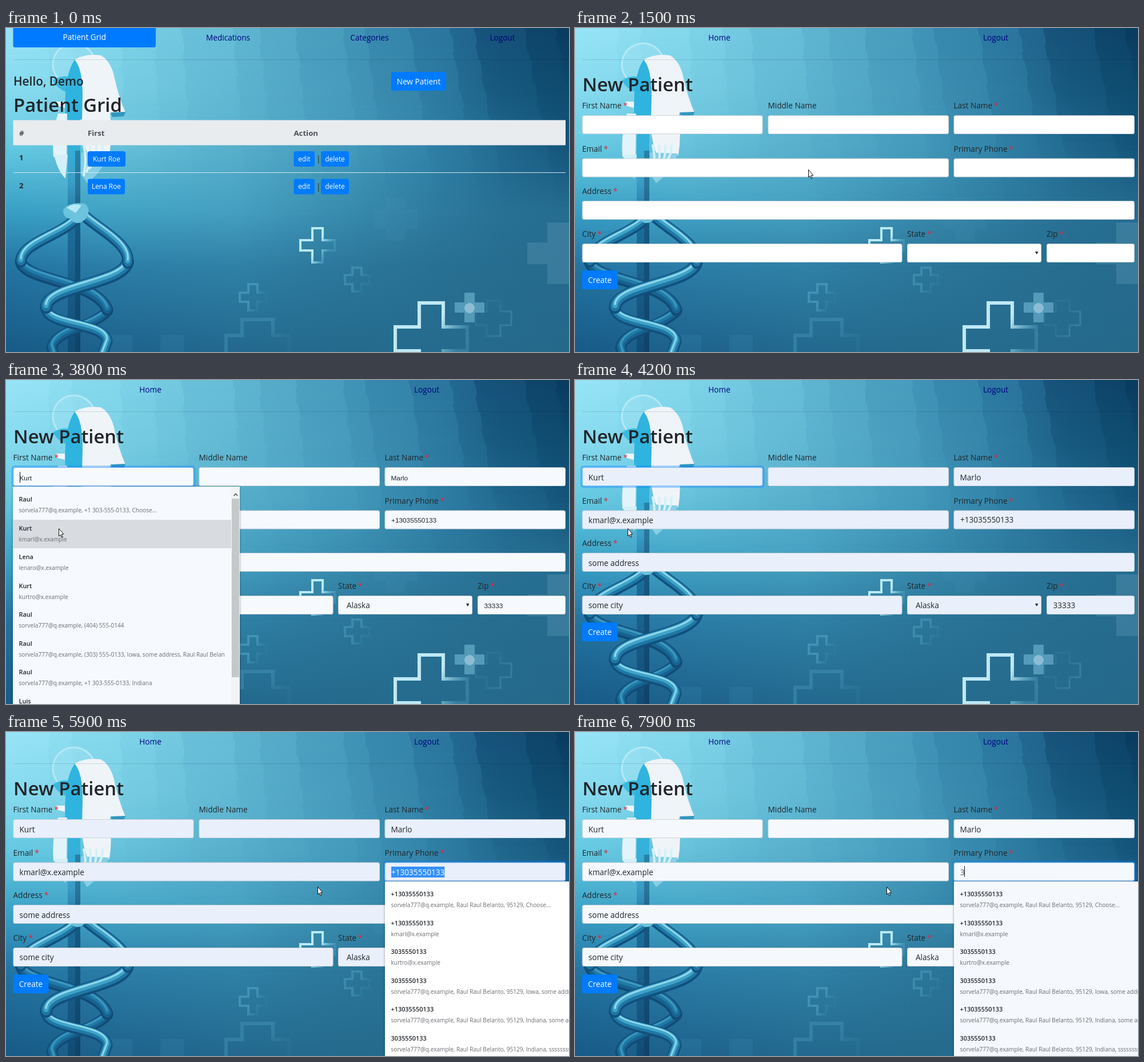
Write an HTML page with a canvas that moves like this. It is 985 by 568 pixels and loops after 8 s.

```html
<!DOCTYPE html>
<html lang="en">
<head>
<meta charset="utf-8">
<title>Patient form</title>
<style>
html, body { margin: 0; width: 100%; height: 100%; overflow: hidden; background: #2a7599; }
canvas { display: block; }
</style>
</head>
<body>
<canvas id="stage" width="985" height="568"></canvas>
<script>
const W = 985, H = 568, LOOP = 8000;
const SANS = '"Open Sans", sans-serif', ARIAL = '"Liberation Sans", sans-serif';
const BLUE = '#007bff', INK = '#212529';
const ctx = document.getElementById('stage').getContext('2d');

// ---------- background ----------
const skyX = [0, 200, 400, 600, 750, 870, 985];
const skyY = [0, 110, 210, 320, 420, 568];
const sky = [
  '9be6f9 80d6ea 61b8d4 4196b8 2a769f 154f78 0a3b5f',
  '88dcf1 78cfe4 5eb6d2 4598ba 2f7da3 175a80 0d4a6d',
  '62c8e1 66c0d9 57aecb 439abb 3080a6 22698f 14547a',
  '389fc5 42a3c4 459fc0 388bad 2e7b9f 287094 256c90',
  '2273a2 2b7da7 2f80a5 2b769a 287093 266d90 256b8e',
  '175a87 1d628c 23688e 246a8d 256b8e 256a8d 246889'
].map(row => row.split(' ').map(h => [0, 2, 4].map(i => parseInt(h.substr(i, 2), 16))));

const mix = (a, b, k) => a + (b - a) * k;
const mixColor = (a, b, k) => a.map((v, i) => mix(v, b[i], k));
const rgb = c => `rgb(${c.map(Math.round)})`;

function span(list, v) {
  let i = 0;
  while (i < list.length - 2 && v > list[i + 1]) i++;
  return [i, Math.min(1, Math.max(0, (v - list[i]) / (list[i + 1] - list[i])))];
}

function skyAt(x, y) {
  const [i, u] = span(skyX, x), [j, v] = span(skyY, y);
  return mixColor(mixColor(sky[j][i], sky[j][i + 1], u), mixColor(sky[j + 1][i], sky[j + 1][i + 1], u), v);
}

function path(g, points, close) {
  g.beginPath();
  points.forEach(([x, y], i) => i ? g.lineTo(x, y) : g.moveTo(x, y));
  if (close) g.closePath();
}

function cross(g, cx, cy, r, arm) {
  const quarter = [[-arm, -arm], [-arm, -r], [arm, -r]];
  const pts = [];
  for (let q = 0; q < 4; q++)
    for (const [x, y] of quarter) {
      const [a, b] = [[x, y], [-y, x], [-x, -y], [y, -x]][q];
      pts.push([cx + a, cy + b]);
    }
  path(g, pts, true);
}

function outlineCross(g, cx, cy, r, arm, width, from, to) {
  const fade = g.createLinearGradient(cx - r, cy - r / 2, cx + r, cy + r / 2);
  fade.addColorStop(0, from);
  fade.addColorStop(0.5, from);
  fade.addColorStop(0.85, to);
  cross(g, cx, cy, r, arm);
  g.lineWidth = width;
  g.strokeStyle = fade;
  g.stroke();
}

const FRONT = ['#12507d', '#1f77a4', '#3fa3c8', '#8cd6e9'];
const BACK = ['#114b76', '#18628f', '#2079a6', '#3c98bf'];

function tube(g, d, width, tones) {
  const p = new Path2D(d);
  [[1, 0], [0.75, -1.5], [0.42, -3.5], [0.16, -6]].forEach(([scale, dy], i) => {
    g.save();
    g.translate(0, dy);
    g.lineWidth = width * scale;
    g.strokeStyle = tones[i];
    g.stroke(p);
    g.restore();
  });
}

function fillPath(g, d, color) {
  g.fillStyle = color;
  g.fill(new Path2D(d));
}

function paintStaff(g) {
  g.lineCap = 'round';
  g.lineJoin = 'round';
  const rod = g.createLinearGradient(0, 60, 0, H);
  [[0, '#2bb3df'], [0.28, '#35b2da'], [0.42, '#3a9cc4'], [0.55, '#1d6f9b'], [1, '#124b74']]
    .forEach(s => rod.addColorStop(...s));
  g.fillStyle = rod;
  g.fillRect(108, 150, 22, H - 150);
  g.fillStyle = 'rgba(10,50,85,.35)';
  g.fillRect(121, 215, 9, H - 215);

  // globe and wings
  g.fillStyle = 'rgba(190,238,249,.22)';
  g.strokeStyle = '#b3e9f6';
  g.lineWidth = 3;
  g.beginPath();
  g.arc(119, 64, 37, 0, 7);
  g.fill();
  g.stroke();
  fillPath(g, 'M82 92Q98 82 110 86L104 112Q90 106 82 92Z', '#3cb9de');
  fillPath(g, 'M121 55Q140 44 166 48Q184 58 190 88Q198 124 209 148L182 150Q186 190 181 222Q168 232 150 238Q132 205 131 150Q130 90 121 55Z', '#eff4f9');
  fillPath(g, 'M120 56Q134 70 134 120L133 160L104 160Q100 84 120 56Z', '#2fb4df');
  fillPath(g, 'M183 148L209 147L206 155L186 156Z', '#3197bf');
  fillPath(g, 'M88 129L103 129L103 140L88 136Z', '#e9f7fc');
  fillPath(g, 'M91 150Q80 185 83 226L106 229L107 150Z', '#e3f3fa');
  fillPath(g, 'M84 222Q90 250 104 264L108 222Z', '#d4eff8');
  fillPath(g, 'M131 218L180 220Q170 250 142 272L131 255Z', '#86cfe5');
  g.strokeStyle = '#d4f1f9';
  g.lineWidth = 4;
  for (let i = 0; i < 4; i++) {
    g.beginPath();
    g.moveTo(136 + i * 11, 206);
    g.quadraticCurveTo(142 + i * 9, 230, 136 + i * 5, 258 - i * 6);
    g.stroke();
  }

  // helix
  tube(g, 'M178 496C150 526 86 530 80 560L84 574', 19, BACK);
  tube(g, 'M26 410C34 444 160 444 177 494', 21, BACK);
  tube(g, 'M70 492C74 524 174 516 177 550L168 574', 19, FRONT);
  tube(g, 'M213 410C204 450 72 452 70 490', 22, FRONT);
  tube(g, 'M136 328C160 352 218 378 213 412', 20, FRONT);
  tube(g, 'M126 328C108 362 26 374 26 410', 20, FRONT);
  fillPath(g, 'M100 318Q112 304 138 308Q150 318 140 334Q124 350 112 334Q100 334 100 318Z', '#6cc3de');
  fillPath(g, 'M106 315Q118 306 132 311L122 324Z', '#b4eaf5');
}

function paintBackground() {
  const layer = document.createElement('canvas');
  layer.width = W;
  layer.height = H;
  const g = layer.getContext('2d');
  for (let y = 0; y < H; y += 2) {
    const grad = g.createLinearGradient(0, 0, W, 0);
    skyX.forEach(x => grad.addColorStop(x / W, rgb(skyAt(x, y))));
    g.fillStyle = grad;
    g.fillRect(0, y, W, 2);
    // stepped rays, strongest near the top
    g.globalAlpha = Math.max(0, 0.8 - y / 450);
    for (let i = 0; i < 16; i++) {
      const edge = k => k * 64 + 14 * Math.sin(k * 2.3) + Math.min(y, 300) * 0.22 * k / 16
        + 2 * Math.sin(Math.floor(y / 14) * 1.7 + k);
      const a = i ? Math.round(edge(i)) : 0, b = Math.round(edge(i + 1));
      g.fillStyle = rgb(skyAt((a + b) / 2, y));
      g.fillRect(a, y, b - a, 2);
    }
    g.globalAlpha = 1;
  }

  g.fillStyle = 'rgba(110,165,190,.28)';
  cross(g, 966, 395, 54, 19);
  g.fill();
  g.fillStyle = 'rgba(90,160,190,.1)';
  cross(g, 682, 335, 38, 17);
  g.fill();
  g.fillStyle = 'rgba(70,150,185,.16)';
  g.fillRect(181, 538, 40, 30);
  g.fillRect(270, 538, 41, 30);

  outlineCross(g, 432, 472, 23, 8, 4, 'rgba(76,160,192,.65)', 'rgba(60,140,175,.15)');
  outlineCross(g, 440, 566, 55, 27, 6, 'rgba(66,146,180,.5)', 'rgba(50,125,160,.2)');
  outlineCross(g, 614, 441, 21, 8, 4, 'rgba(76,160,192,.5)', 'rgba(60,140,175,.2)');
  outlineCross(g, 853, 509, 31, 12, 3, 'rgba(80,155,185,.15)', 'rgba(80,155,185,.4)');
  outlineCross(g, 545, 381, 30, 9, 4, '#b9eaf6', 'rgba(90,175,205,.3)');
  outlineCross(g, 744, 545, 63, 21, 6, '#bfe9f5', 'rgba(90,170,200,.3)');
  g.fillStyle = 'rgba(95,165,195,.8)';
  cross(g, 811, 490, 26, 9);
  g.fill();
  g.fillStyle = '#8dbdd4';
  g.beginPath();
  g.arc(811, 491, 9, 0, 7);
  g.fill();

  paintStaff(g);
  return layer;
}
const background = paintBackground();

// ---------- widgets ----------
function text(s, x, y, size = 13.6, { color = INK, weight = 400, align = 'left', family = SANS } = {}) {
  ctx.font = `${weight} ${size}px ${family}`;
  ctx.fillStyle = color;
  ctx.textAlign = align;
  ctx.fillText(s, x, y);
  return ctx.measureText(s).width;
}

function box(x, y, w, h, fill, radius = 3.6) {
  ctx.beginPath();
  ctx.roundRect(x, y, w, h, radius);
  ctx.fillStyle = fill;
  ctx.fill();
}

function button(label, x, y, w, h, size = 13.6, fill = BLUE) {
  box(x, y, w, h, fill);
  text(label, x + w / 2, y + h / 2 + size * 0.37, size, { color: '#fff', align: 'center' });
}

function nav(items) {
  for (const [label, x] of items) text(label, x, 22, 13.6, { color: '#00007f', align: 'center' });
  ctx.fillStyle = 'rgba(0,0,0,.12)';
  ctx.fillRect(13, 55, 966, 1);
}

function caret(x, y) {
  ctx.fillStyle = '#111';
  ctx.fillRect(Math.round(x), y, 1, 19);
}

function field(x, y, w, fill, focus) {
  if (focus) box(x - 3, y - 3, w + 6, 39, 'rgba(0,123,255,.33)', 6);
  box(x, y, w, 33, focus ? '#80bdff' : '#ced4da');
  box(x + 1, y + 1, w - 2, 31, fill, 3);
}

function label(s, x, y, required = true) {
  const w = text(s, x, y);
  if (required) text('*', x + w + 3, y, 13.6, { color: '#f02030' });
}

function pointer(x, y) {
  path(ctx, [[0, 0], [0, 13.5], [3.1, 10.7], [5.2, 15.5], [7.3, 14.6], [5.2, 10], [9.2, 9.7]]
    .map(([a, b]) => [x + 0.5 + a * 0.9, y + 0.5 + b]), true);
  ctx.fillStyle = '#fff';
  ctx.fill();
  ctx.lineWidth = 1;
  ctx.strokeStyle = '#111';
  ctx.stroke();
}

function suggestions(x, y, w, items, fill, active = -1) {
  ctx.save();
  ctx.shadowColor = 'rgba(0,0,0,.35)';
  ctx.shadowBlur = 4;
  ctx.fillStyle = fill;
  ctx.fillRect(x, y, w, H);
  ctx.restore();
  items.forEach(([title, detail], i) => {
    const top = y + 7 + i * 50.5;
    if (i === active) {
      ctx.fillStyle = '#d8dbdf';
      ctx.fillRect(x, Math.round(top), w - 15, 50);
    }
    text(title, x + 10.5, top + 19, 10.9, { weight: 600 });
    text(detail, x + 10.5, top + 38, 10.1, { color: '#6a6d72' });
  });
}

// ---------- content ----------
const MAIL = 'sorvela777@q.example', FULL = 'Raul Raul Belanto', PHONE = '+13035550133';
const people = [
  ['Raul', `${MAIL}, +1 303-555-0133, Choose...`],
  ['Kurt', 'kmarl@x.example'],
  ['Lena', 'lenaro@x.example'],
  ['Kurt', 'kurtro@x.example'],
  ['Raul', `${MAIL}, (404) 555-0144`],
  ['Raul', `${MAIL}, (303) 555-0133, Iowa, some address, Raul Raul Belan`],
  ['Raul', `${MAIL}, +1 303-555-0133, Indiana`],
  ['Luis', '']
];
const phones = [
  [PHONE, `${MAIL}, ${FULL}, 95129, Choose...`],
  [PHONE, 'kmarl@x.example'],
  ['3035550133', 'kurtro@x.example'],
  ['3035550133', `${MAIL}, ${FULL}, 95129, Iowa, some address`],
  [PHONE, `${MAIL}, ${FULL}, 95129, Indiana, some address`],
  ['3035550133', `${MAIL}, ${FULL}, 95129, Indiana, ssssssssssss`]
];
const raul = { first: 'Raul', last: 'Belanto', phone: PHONE, state: 'Choose...', zip: '95129' };
const kurt = {
  first: 'Kurt', last: 'Marlo', phone: PHONE, state: 'Alaska', zip: '33333',
  email: 'kmarl@x.example', address: 'some address', city: 'some city'
};

function gridPage(t) {
  nav([['Medications', 388.5], ['Categories', 636], ['Logout', 868.5]]);
  button('Patient Grid', 12.5, -3, 249.5, 37);
  text('Hello, Demo', 13, 101, 20.8, { weight: 600 });
  text('Patient Grid', 13, 147, 32.8, { weight: 600 });
  button('New Patient', 674, 77, 96, 33, 13.6, t >= 1000 ? '#0069d9' : BLUE);
  ctx.fillStyle = '#e9ecef';
  ctx.fillRect(12.5, 161.5, 966.5, 44);
  for (const [s, x] of [['#', 23], ['First', 143], ['Action', 503.5]])
    text(s, x, 188.5, 13.2, { color: '#495057', weight: 700 });
  ['Kurt Roe', 'Lena Roe'].forEach((name, i) => {
    const y = 216 + i * 48.5;
    text(i + 1, 23, y + 16, 13.2, { weight: 700 });
    button(name, 143, y, i ? 65 : 66, 27, 11.9);
    button('edit', 503.5, y, 36.5, 27, 11.9);
    text('|', 543, y + 18);
    button('delete', 551, y, 49, 27, 11.9);
  });
  ctx.fillStyle = '#cfe6ee';
  ctx.fillRect(13, 253, 966, 1);
}

function formPage(t) {
  const preview = t >= 2600 && t < 4200;
  const data = t < 2600 ? {} : t < 3400 ? raul : kurt;
  const fill = t < 2600 ? '#fff' : preview ? '#f6fafe' : t < 7900 ? '#e9f0fc' : '#f5f9fe';
  const firstFocus = t >= 2400 && t < 5400, phoneFocus = t >= 5400;
  const value = (s, x, y) => s && text(s, x, y, preview ? 11.8 : 13.6, { family: preview ? ARIAL : SANS });

  nav([['Home', 252.5], ['Logout', 736]]);
  text('New Patient', 13, 111, 32.8, { weight: 600 });
  label('First Name', 12.5, 141);
  label('Middle Name', 337.5, 141, false);
  label('Last Name', 662.5, 141);
  label('Email', 12.5, 217);
  label('Primary Phone', 662.5, 217);
  label('Address', 12.5, 291);
  label('City', 12.5, 366);
  label('State', 581, 366);
  label('Zip', 825, 366);

  field(12.5, 153, 316, fill, firstFocus);
  field(337.5, 153, 316.5, fill);
  field(662.5, 153, 316.5, fill);
  field(12.5, 228.5, 641.5, fill);
  field(662.5, 228.5, 316.5, fill, phoneFocus);
  field(12.5, 303, 966.5, fill);
  field(12.5, 378, 560, fill);
  field(581, 378, 235, fill);
  field(825, 378, 154, fill);
  path(ctx, [[805, 392], [810.5, 392], [807.8, 397]], true);
  ctx.fillStyle = '#222';
  ctx.fill();

  value(data.first, 23.5, 176);
  value(data.last, 673.5, 176);
  value(data.email, 23.5, 251);
  value(data.address, 23.5, 326);
  value(data.city, 23.5, 400);
  value(data.zip, 836.5, 400);
  if (data.state) text(data.state, 596, 400);

  if (t < 5600) value(data.phone, 674, 250);
  else if (t < 6900) {
    ctx.font = `13.6px ${SANS}`;
    ctx.fillStyle = '#3390ff';
    ctx.fillRect(674, 236, ctx.measureText(PHONE).width, 19);
    text(PHONE, 674, 251, 13.6, { color: '#fff' });
  } else if (t >= 7900) text('3', 674, 251, 13.6, { color: '#555' });

  button('Create', 12.5, 425, 62, 33);

  const listOpen = t >= 2400 && t < 4200;
  if (listOpen) {
    suggestions(12, 187, 397, people, t < 2600 ? '#fff' : '#f6fafe', t < 2600 ? -1 : t < 3400 ? 0 : 1);
    ctx.fillStyle = '#f1f3f5';
    ctx.fillRect(394, 188, 15, H);
    ctx.fillStyle = '#c5c8cb';
    ctx.fillRect(395, 208, 13, 313);
    path(ctx, [[398.5, 203], [401.8, 199.5], [405, 203]]);
    ctx.lineWidth = 1.6;
    ctx.strokeStyle = '#50555a';
    ctx.stroke();
  }
  if (phoneFocus && (t < 6900 || t >= 7900))
    suggestions(663, 262, 330, phones, t < 7900 ? '#fff' : '#f5f9fe');

  if (listOpen && (t < 3300 || t >= 3800)) caret(24, 161);
  if (t >= 5100 && t < 5400) caret(52, 161);
  if (t >= 6900 && t < 7400) caret(674, 235);
  if (t >= 7900) caret(681, 235);
}

// pointer trips: [start, end, hide, from, to]
const trips = [
  [300, 1000, 1300, [846, 543], [722, 96]],
  [1300, 1500, 1500, [722, 96], [408, 248]],
  [1500, 2100, 2100, [408, 248], [120, 170]],
  [2600, 2800, 3200, [95, 211], [95, 215]],
  [3200, 3600, 4200, [95, 215], [92, 260]],
  [4200, 4900, 5100, [92, 260], [817, 247]],
  [5800, 5900, LOOP, [544, 264], [545, 271]]
];

function drawPointer(t) {
  const trip = trips.find(([start, , hide]) => t >= start && t < hide);
  if (!trip) return;
  const [start, end, , from, to] = trip;
  const k = Math.min(1, (t - start) / (end - start)), e = k * k * (3 - 2 * k);
  pointer(Math.round(mix(from[0], to[0], e)), Math.round(mix(from[1], to[1], e)));
}

function frame(now) {
  const t = Math.floor((now % LOOP) / 100) * 100;
  ctx.drawImage(background, 0, 0);
  (t < 1300 ? gridPage : formPage)(t);
  drawPointer(t);
  requestAnimationFrame(frame);
}
requestAnimationFrame(frame);
</script>
</body>
</html>
```
